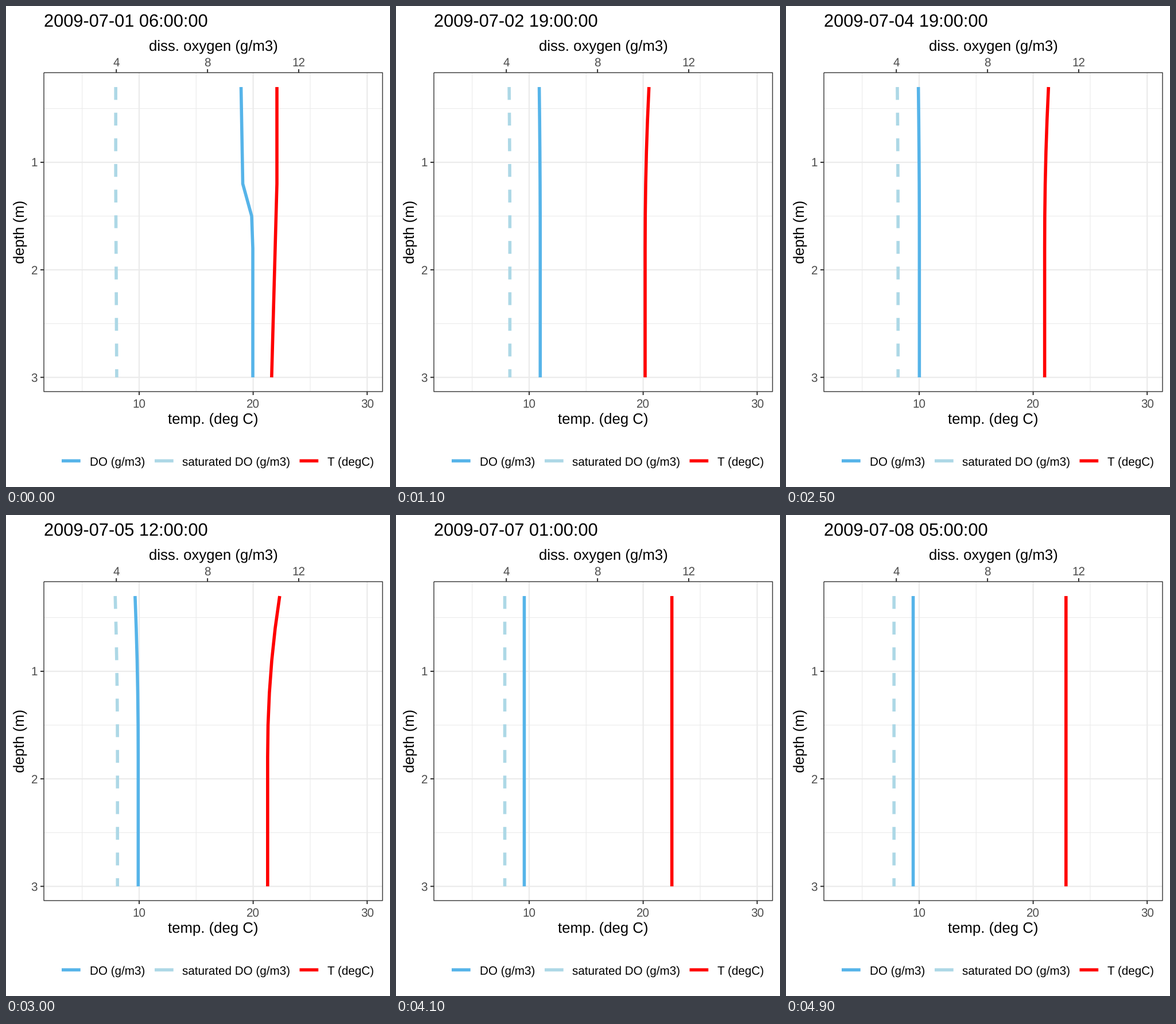
A matplotlib script that plays this animation: 669 px wide and 837 px high, repeating every 5 s.

```python
import numpy as np
import matplotlib.pyplot as plt
from matplotlib.animation import FuncAnimation

W, H, DPI = 669, 837, 64
FRAMES, INTERVAL = 50, 100
LAST_HOUR = 167
PT = 72 / DPI  # points per pixel
LEFT, RIGHT, TOP, BOTTOM = 66, 656, 116, 671
DARK, GREY, GRID = "#333333", "#4D4D4D", "#EBEBEB"
BLUE, PALE, RED = "#56B4E9", "#ADD8E6", "#FF0000"
LINE = 5.58

plt.rcParams["font.family"] = "Liberation Sans"
plt.rcParams["text.hinting"] = "none"
fig = plt.figure(figsize=(W / DPI, H / DPI), dpi=DPI, facecolor="white")
ax = fig.add_axes([0, 0, 1, 1])
ax.set_xlim(0, W)
ax.set_ylim(H, 0)
ax.axis("off")


def temp_x(value):
    return 232 + (value - 10) * 19.86


def oxygen_x(value):
    return 192.2 + (value - 4) * 39.72


def depth_y(value):
    return 272 + (value - 1) * 187.1


def line(xs, ys, color, width, **kw):
    return ax.plot(xs, ys, color=color, lw=width * PT, snap=False,
                   solid_capstyle="butt", dash_capstyle="butt", **kw)[0]


def text(x, y, label, size, color="black", **kw):
    return ax.text(x, y, label, fontsize=size * PT, color=color,
                   va="baseline", **kw)


# Grid, ticks and frame
for t in (5, 15, 25):
    line([temp_x(t)] * 2, [TOP, BOTTOM], GRID, 1.1)
for d in (0.5, 1.5, 2.5):
    line([LEFT, RIGHT], [depth_y(d)] * 2, GRID, 1.1)
for t in (10, 20, 30):
    x = temp_x(t)
    line([x, x], [TOP, BOTTOM], GRID, 2.2)
    line([x, x], [BOTTOM, BOTTOM + 6], DARK, 2)
    text(x, 699, str(t), 20.6, GREY, ha="center")
for d in (1, 2, 3):
    y = depth_y(d)
    line([LEFT, RIGHT], [y, y], GRID, 2.2)
    line([LEFT - 6, LEFT], [y, y], DARK, 2)
    text(55, y + 7.4, str(d), 20.6, GREY, ha="right")
for o in (4, 8, 12):
    x = oxygen_x(o)
    line([x, x], [TOP - 6, TOP], DARK, 2)
    text(x, 105, str(o), 20.6, GREY, ha="center")
line([LEFT, RIGHT, RIGHT, LEFT, LEFT], [TOP, TOP, BOTTOM, BOTTOM, TOP],
     DARK, 1.4, zorder=4)

# Titles and legend
title = text(65.5, 36, "", 30.8)
text(361, 79, "diss. oxygen (g/m3)", 25.8, ha="center")
text(361, 728, "temp. (deg C)", 25.8, ha="center")
text(32.5, 393, "depth (m)", 25.8, ha="center", rotation=90,
     rotation_mode="anchor")
for key_x, label_x, label, color in ((97, 146, "DO (g/m3)", BLUE),
                                     (259, 307, "saturated DO (g/m3)", PALE),
                                     (511.5, 560, "T (degC)", RED)):
    line([key_x, key_x + 32.7], [791.5] * 2, color, LINE)
    text(label_x, 799.5, label, 20.6)

# Profiles, as horizontal positions at ten depths
DEPTHS = np.arange(1, 11) * 0.3
YS = depth_y(DEPTHS)
START_TEMP = 472 - 9.2 * np.clip((DEPTHS - 1.2) / 1.8, 0, 1)
START_OXYGEN = np.interp(DEPTHS, [0.3, 1.2, 1.5, 1.8], [409.5, 412.5, 428, 430])


def smoothstep(u):
    u = np.clip(u, 0, 1)
    return u * u * (3 - 2 * u)


def profiles(hour):
    """Slow warming with a daily cycle and a warm surface layer by day."""
    clock = (hour + 6) % 24
    mixed = (432.7 + 56 * smoothstep((hour - 28) / 155)
             + 3 * np.cos(2 * np.pi * clock / 24))
    warm = 31 * np.sin(np.pi * np.clip((clock - 8) / 13, 0, 1)) ** 2
    temp = mixed + warm * np.clip((1.8 - DEPTHS) / 1.5, 0, 1) ** 2.1
    oxygen = 231.5 - 0.26 * (temp - 449.5) + 47 * np.exp((17 - hour) / 18.3)

    start = max(0, 1 - hour / 14)
    temp += start * (START_TEMP - temp)
    oxygen += start * (START_OXYGEN - oxygen)
    saturated = 198 - 0.19 * (temp - 436)
    return saturated, oxygen, temp


curves = [line(YS, YS, PALE, LINE, ls=(0, (4, 4)), zorder=3),
          line(YS, YS, BLUE, LINE, zorder=3),
          line(YS, YS, RED, LINE, zorder=3)]


def update(i):
    hour = i * LAST_HOUR // (FRAMES - 1)
    day, clock = divmod(hour + 6, 24)
    title.set_text(f"2009-07-{day + 1:02d} {clock:02d}:00:00")
    for curve, xs in zip(curves, profiles(hour)):
        curve.set_data(xs, YS)
    return [title, *curves]


anim = FuncAnimation(fig, update, frames=FRAMES, interval=INTERVAL,
                     repeat=True, repeat_delay=0, blit=False)
plt.show()
```
